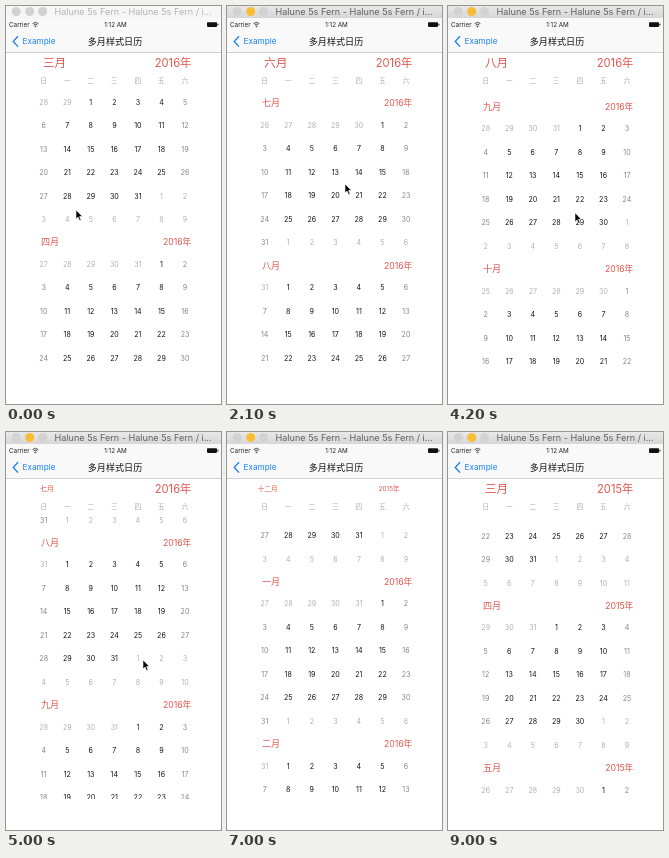
Animation of 215 by 398 pixels, one loop 9.1 s. Source, as an HTML page:

```html
<!DOCTYPE html>
<html lang="zh-CN">
<head>
<meta charset="utf-8">
<style>
html, body { margin: 0; width: 100%; height: 100%; overflow: hidden; background: #fff; }
svg { display: block; width: 100vw; height: 100vh; }
text { font-family: Inter, "Noto Sans CJK SC", "Noto Sans CJK", sans-serif; }
.red { fill: #e0574f; }
</style>
</head>
<body>
<svg id="stage" viewBox="0 0 215 398">
  <defs>
    <linearGradient id="chrome" x2="0" y2="1">
      <stop stop-color="#e8e8e8"/><stop offset="1" stop-color="#d6d6d6"/>
    </linearGradient>
    <clipPath id="window"><rect y="84" width="215" height="283"/></clipPath>
  </defs>
  <rect width="215" height="398" fill="#fff"/>
  <rect y="12" width="215" height="34.5" fill="#f9f9f9"/>
  <path d="M0 46.5H215" stroke="#b8b8b8" stroke-width=".6"/>
  <rect id="bar" width="215" height="12"/>
  <g fill="#d2d2d2">
    <circle cx="10.2" cy="5.5" r="4.5"/>
    <circle id="light" cx="23.7" cy="5.5" r="4.5"/>
    <circle cx="36.6" cy="5.5" r="4.5"/>
  </g>
  <text id="caption" x="48.5" y="9.2" font-size="9.1">Halune 5s Fern - Halune 5s Fern / i...</text>

  <g font-size="6.3" fill="#222">
    <text x="3" y="20.8">Carrier</text>
    <text x="109.5" y="20.8" text-anchor="middle">1:12 AM</text>
  </g>
  <g fill="none" stroke="#333" stroke-width=".9">
    <path d="M26.6 17.6Q29.5 15 32.4 17.6M27.7 19Q29.5 17.4 31.3 19"/>
    <circle cx="29.5" cy="20.4" r=".5"/>
  </g>
  <rect x="201" y="16.3" width="10" height="4.6" rx=".8" fill="#111"/>
  <rect x="211.4" y="17.7" width="1" height="1.8" fill="#111"/>
  <path d="M12 30.2L7.3 35.4L12 40.6" fill="none" stroke="#1a80f5" stroke-width="1.4"/>
  <text x="16.5" y="38.4" font-size="8.2" fill="#1a80f5">Example</text>
  <text x="109" y="38.8" font-size="9.1" text-anchor="middle" fill="#111">多月样式日历</text>

  <g id="weekdays"></g>
  <g id="list" clip-path="url(#window)"></g>
  <text id="month" class="red" font-size="11.6" x="48.5" y="60.8" text-anchor="middle"></text>
  <text id="year" class="red" font-size="11.2" x="185.3" y="60.6" text-anchor="end"></text>
  <path id="cursor" d="M0 0V9L2.1 7.1L3.6 10.6L5.1 10L3.6 6.5H6.4Z" fill="#000" stroke="#fff" stroke-width=".6"/>
</svg>
<script>
const LOOP = 9100, PERIOD = 162.3, ROW = 23.5, COLUMN = 23.55;
const LEFT = 37.7, FIRST_HEADER = 73.9, LIST_TOP = 84;
const FIRST_MONTH = -14, LAST_MONTH = 9;
const HAN = ['一', '二', '三', '四', '五', '六', '七', '八', '九', '十', '十一', '十二'];
const $ = id => document.getElementById(id);

function svg(tag, parent, attributes = {}) {
  const node = document.createElementNS('http://www.w3.org/2000/svg', tag);
  for (const key in attributes) node.setAttribute(key, attributes[key]);
  return parent.appendChild(node);
}

// Monotone cubic curve through [time, value] points.
function curve(...points) {
  const slope = points.slice(1).map((p, i) => (p[1] - points[i][1]) / (p[0] - points[i][0]));
  const tangent = points.map((_, i) => {
    const a = slope[i - 1], b = slope[i];
    return a * b > 0 ? 2 * a * b / (a + b) : 0;
  });
  return t => {
    if (t <= points[0][0]) return points[0][1];
    const i = points.findIndex(p => p[0] > t) - 1;
    if (i < 0) return points[points.length - 1][1];
    const [t0, v0] = points[i], [t1, v1] = points[i + 1];
    const h = t1 - t0, u = (t - t0) / h, w = 1 - u;
    return v0 * (1 + 2 * u) * w * w + v1 * u * u * (3 - 2 * u)
      + h * u * w * (tangent[i] * w - tangent[i + 1] * u);
  };
}

// Forward to autumn, then back in two long flicks.
const scrollAt = curve([350, 0], [2100, 625.7], [3050, 802], [3300, 858.8], [4100, 950], [5000, 775],
  [5800, 140], [6100, 8.5], [6900, -320], [7700, -1360], [7900, -1583], [9000, -1885]);
const cursorX = curve([0, 70], [2100, 118], [3300, 115], [5000, 137], [6100, 93]);
const cursorY = curve([0, 204], [2100, 178], [3300, 180], [5000, 228], [6100, 182]);

// A new heading starts at half size, overshoots and settles.
function spring(age) {
  const q = (age / 250) ** 2;
  return 1 - .5 * Math.cos(Math.PI * q) * Math.exp(-1.1 * q);
}

function addText(parent, content, x, y, size, fill, anchor = 'middle') {
  const paint = fill ? { fill } : { class: 'red' };
  svg('text', parent, { x, y: y + size * .36, 'font-size': size, 'text-anchor': anchor, ...paint })
    .textContent = content;
}

const dateOf = index => new Date(2016, 2 + index, 1);
const monthName = date => HAN[date.getMonth()] + '月';
const yearName = date => date.getFullYear() + '年';

function buildMonth(index) {
  const group = svg('g', $('list'));
  const first = dateOf(index);
  addText(group, monthName(first), 35, 0, 9.1, null, 'start');
  addText(group, yearName(first), 185.3, 0, 8.7, null, 'end');
  for (let cell = 0; cell < 42; cell++) {
    const column = cell % 7, row = Math.floor(cell / 7);
    const day = new Date(first.getFullYear(), first.getMonth(), 1 - first.getDay() + cell);
    const outside = day.getMonth() !== first.getMonth();
    const fill = outside ? '#b0b0b0' : column % 6 ? '#111' : '#848484';
    addText(group, day.getDate(), LEFT + column * COLUMN, 22.2 + row * ROW, 7.1, fill);
  }
  return { index, group };
}

[...'日一二三四五六'].forEach((name, i) =>
  addText($('weekdays'), name, LEFT + i * COLUMN, 74.8, 6.7, '#aaa'));
const months = Array.from({ length: LAST_MONTH - FIRST_MONTH + 1 }, (_, i) => buildMonth(FIRST_MONTH + i));

const currentMonth = t => Math.floor((LIST_TOP - FIRST_HEADER + scrollAt(t)) / PERIOD);

function headingScale(t, label) {
  const now = label(t);
  for (let age = 0; age < 500 && age <= t; age += 4) {
    if (label(t - age) !== now) return spring(age);
  }
  return 1;
}

function showHeading(id, t, name, pivot) {
  const label = time => name(dateOf(currentMonth(time)));
  $(id).textContent = label(t);
  $(id).setAttribute('transform',
    `translate(${pivot} 56.5) scale(${headingScale(t, label)}) translate(${-pivot} -56.5)`);
}

function draw(t) {
  const scroll = scrollAt(t), active = t >= 250;
  for (const { index, group } of months) {
    const y = FIRST_HEADER + index * PERIOD - scroll;
    group.style.display = y > -80 && y < 380 ? '' : 'none';
    group.setAttribute('transform', `translate(0 ${y})`);
  }
  showHeading('month', t, monthName, 30);
  showHeading('year', t, yearName, 155);
  $('bar').setAttribute('fill', active ? 'url(#chrome)' : '#f6f6f6');
  $('light').setAttribute('fill', active ? '#f7bd35' : '#d2d2d2');
  $('caption').setAttribute('fill', active ? '#606060' : '#b4b4b4');
  $('cursor').setAttribute('transform', `translate(${cursorX(t)} ${cursorY(t)})`);
  $('cursor').style.display = t < 7000 ? '' : 'none';
}

const start = performance.now();
function tick() {
  draw((performance.now() - start) % LOOP);
  requestAnimationFrame(tick);
}
tick();
</script>
</body>
</html>
```
